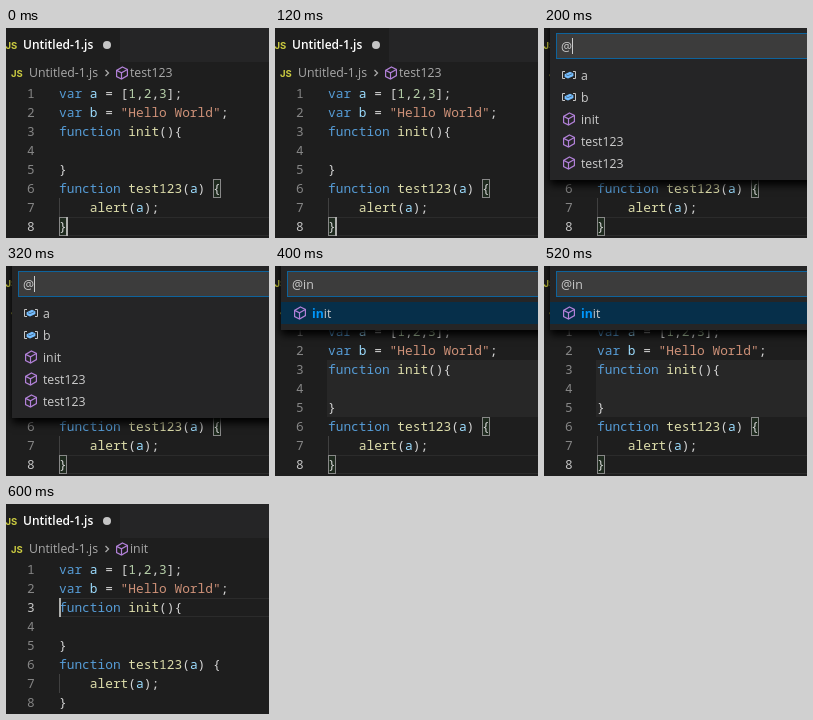
Animation, 263 px wide and 210 px high, one loop 800 ms. Source, as an HTML page with a canvas:

```html
<!DOCTYPE html>
<html lang="en">
<head>
<meta charset="utf-8">
<title>Go to symbol</title>
<style>
html, body { margin: 0; width: 100%; height: 100%; overflow: hidden; background: #1e1e1e; }
canvas { display: block; width: 263px; height: 210px; }
</style>
</head>
<body>
<canvas id="stage" width="263" height="210"></canvas>
<script>
const W = 263, H = 210, LINE = 19, TOP = 56, LEFT = 53, CHAR = 7.7;
const STEP = 200;
const canvas = document.getElementById('stage');
const ratio = window.devicePixelRatio || 1;
canvas.width = W * ratio;
canvas.height = H * ratio;
const ctx = canvas.getContext('2d', { alpha: false });
ctx.scale(ratio, ratio);
ctx.textBaseline = 'alphabetic';

const SANS = '"Open Sans", "Noto Sans", sans-serif';
const MONO = '500 12.83px "Noto Sans Mono", "DejaVu Sans Mono", monospace';
const UI = '500 12.3px ' + SANS;
const TITLE = '600 12px ' + SANS;
const BOLD = 'bold 12.3px ' + SANS;
const ICON = 'bold 9.5px Inter, sans-serif';

const KEY = '#569cd6', VAR = '#9cdcfe', NUM = '#b5cea8', STR = '#ce9178', FN = '#dcdcaa', PLAIN = '#d4d4d4';
const CODE = [
  [['var', KEY], [' a', VAR], [' = [', PLAIN], ['1', NUM], [',', PLAIN], ['2', NUM], [',', PLAIN], ['3', NUM], ['];', PLAIN]],
  [['var', KEY], [' b', VAR], [' = ', PLAIN], ['"Hello World"', STR], [';', PLAIN]],
  [['function', KEY], [' init', FN], ['(){', PLAIN]],
  [],
  [['}', PLAIN]],
  [['function', KEY], [' test123', FN], ['(', PLAIN], ['a', VAR], [') {', PLAIN]],
  [['    alert', FN], ['(', PLAIN], ['a', VAR], [');', PLAIN]],
  [['}', PLAIN]]
];

const SCENES = [
  { line: 8, caret: LEFT + CHAR, crumb: 'test123' },
  { line: 8, crumb: 'test123', query: '@', inputCaret: true,
    items: [['var', 'a'], ['var', 'b'], ['fn', 'init'], ['fn', 'test123'], ['fn', 'test123']] },
  { line: 8, crumb: 'test123', query: '@in', range: [3, 5], selected: true,
    items: [['fn', 'init', 2]] },
  { line: 3, caret: LEFT + 1, crumb: 'init' }
];

const rowY = n => TOP + (n - 1) * LINE;

function rect(x, y, w, h, color) {
  ctx.fillStyle = color;
  ctx.fillRect(x, y, w, h);
}

function frame(x, y, w, h, color) {
  ctx.strokeStyle = color;
  ctx.lineWidth = 1;
  ctx.strokeRect(x + 0.5, y + 0.5, w - 1, h - 1);
}

function text(str, x, y, font, color) {
  ctx.font = font;
  ctx.fillStyle = color;
  ctx.fillText(str, x, y);
  return x + ctx.measureText(str).width;
}

function path(points, close) {
  ctx.beginPath();
  points.forEach(([x, y]) => ctx.lineTo(x, y));
  if (close) ctx.closePath();
  ctx.stroke();
}

function cube(x, y) {
  ctx.save();
  ctx.translate(x, y);
  ctx.strokeStyle = '#b180d7';
  ctx.lineWidth = 1.2;
  path([[0.5, -6], [5.4, -3.6], [5.4, 2.6], [-0.5, 6], [-5.4, 3.6], [-5.4, -2.6]], true);
  path([[-5.4, -2.6], [-0.5, -0.2], [5.4, -3.6]]);
  path([[-0.5, -0.2], [-0.5, 6]]);
  ctx.restore();
}

function variable(x, y) {
  ctx.save();
  ctx.translate(x, y);
  ctx.strokeStyle = '#c5c5c5';
  ctx.lineWidth = 1;
  path([[-4, -3.5], [-6.5, -3.5], [-6.5, 3.5], [-4, 3.5]]);
  path([[4, -3.5], [6.5, -3.5], [6.5, 3.5], [4, 3.5]]);
  ctx.fillStyle = '#75beff';
  ctx.beginPath();
  ctx.moveTo(-4.4, -0.8);
  ctx.lineTo(1, -3.2);
  ctx.lineTo(4.4, -1.8);
  ctx.lineTo(4.4, 1);
  ctx.lineTo(-1, 3.4);
  ctx.lineTo(-4.4, 2);
  ctx.fill();
  ctx.strokeStyle = '#252526';
  ctx.lineWidth = 0.5;
  path([[-3, -0.3], [-1, 0.6], [3.2, -1.3]]);
  ctx.restore();
}

function header(s) {
  rect(0, 0, W, 34, '#252526');
  rect(0, 0, 114, 34, '#1e1e1e');
  text('JS', -0.5, 20.5, ICON, '#cbcb41');
  text('Untitled-1.js', 17, 21, TITLE, '#ffffff');
  ctx.fillStyle = '#c5c5c5';
  ctx.beginPath();
  ctx.arc(101, 17, 4, 0, Math.PI * 2);
  ctx.fill();

  text('JS', 5, 48.5, ICON, '#cbcb41');
  text('Untitled-1.js', 23, 49, UI, '#a9a9a9');
  ctx.strokeStyle = '#a9a9a9';
  ctx.lineWidth = 1.3;
  path([[99.5, 42], [102.5, 45], [99.5, 48]]);
  cube(116, 45);
  text(s.crumb, 124, 49, UI, '#a9a9a9');
}

function bracket(col, n) {
  const x = Math.round(LEFT + col * CHAR);
  rect(x, rowY(n), 8, LINE, '#1e2a1e');
  frame(x, rowY(n), 8, LINE, '#888888');
}

function editor(s) {
  if (s.range) {
    const [a, b] = s.range;
    rect(LEFT - 1, rowY(a), W, (b - a + 1) * LINE, '#272727');
  }
  rect(LEFT, rowY(s.line), W, 1, '#2b2b2b');
  rect(LEFT, rowY(s.line) + LINE - 1, W, 1, '#2b2b2b');
  rect(LEFT, rowY(7), 1, LINE, '#404040');
  if (s.line === 8) {
    bracket(20, 6);
    bracket(0, 8);
  }
  CODE.forEach((tokens, i) => {
    const n = i + 1, y = rowY(n) + 14;
    text(String(n), 21, y, MONO, n === s.line ? '#c6c6c6' : '#858585');
    let x = LEFT;
    for (const [str, color] of tokens) {
      text(str, x, y, MONO, color);
      x += str.length * CHAR;
    }
  });
  if (s.caret) rect(Math.round(s.caret) - 1, rowY(s.line), 2, LINE, '#aeafad');
}

function picker(s) {
  const bottom = 42 + s.items.length * 22;
  ctx.save();
  ctx.shadowColor = '#000';
  ctx.shadowBlur = 8 * ratio;
  ctx.shadowOffsetY = 5 * ratio;
  rect(6, -10, W + 10, bottom + 10, '#252526');
  ctx.restore();

  rect(12, 5, W, 26, '#3c3c3c');
  frame(12, 5, W, 26, '#0e639c');
  const end = text(s.query, 17, 23, UI, '#cccccc');
  if (s.inputCaret) rect(Math.round(end), 10, 1, 16, '#cccccc');

  s.items.forEach(([kind, name, hit = 0], i) => {
    const y = 36 + i * 22;
    if (s.selected) rect(6, y, W, 22, '#062f4a');
    (kind === 'var' ? variable : cube)(25, y + 11);
    const x = text(name.slice(0, hit), 37, y + 15.5, BOLD, '#0097fb');
    text(name.slice(hit), x, y + 15.5, UI, '#cccccc');
  });
}

function draw(now) {
  const s = SCENES[Math.floor(now / STEP) % SCENES.length];
  rect(0, 0, W, H, '#1e1e1e');
  header(s);
  editor(s);
  if (s.items) picker(s);
}

const start = performance.now();
function tick() {
  draw(performance.now() - start);
  requestAnimationFrame(tick);
}
tick();
</script>
</body>
</html>
```
